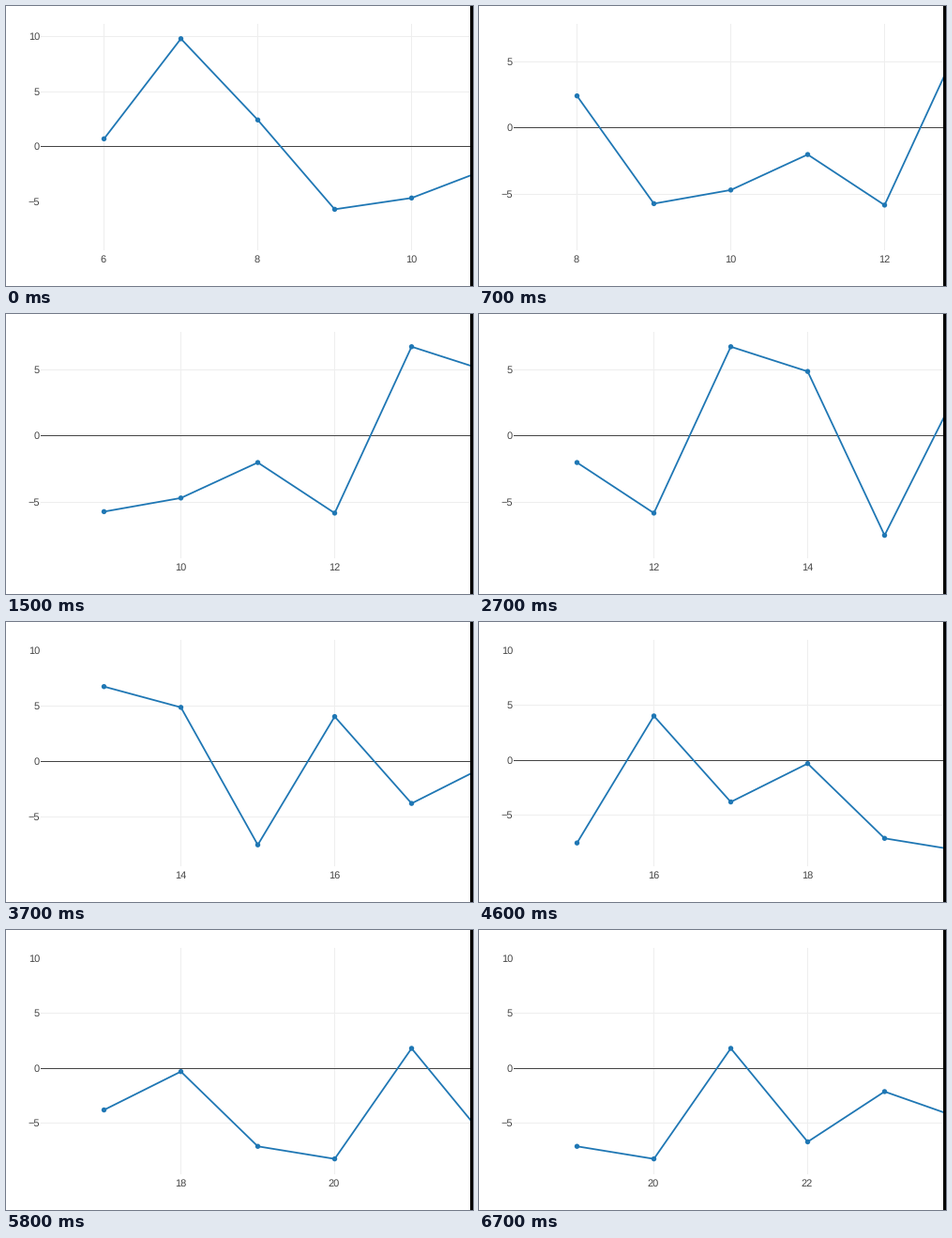
Animation of 498 by 298 pixels, one loop 7.1 s. Source, as a matplotlib script:

```python
import matplotlib.pyplot as plt
from matplotlib.animation import FuncAnimation
from matplotlib.patches import Circle, Rectangle

W, H, DPI = 498, 298, 64
STEP, LOOP = 100, 7100  # ms
PT = 72 / DPI           # points per pixel

LEFT, RIGHT, TOP, BOTTOM = 37, 495, 19, 260
HIGH_Y, LOW_Y = 34.8, 245.7   # where the largest and smallest value sit
RULED_TOP, RULED_END = 32, 208  # grid lines only inside this band
X0, DX = 104.5, 82

BLUE, DARK, GRID = "#1f77b4", "#444444", "#eeeeee"

# Streamed data from x = FIRST on; the last BUFFER points set the y range.
FIRST, BUFFER, SHOWN = 6, 15, 6
DATA = [0.71, 9.83, 2.43, -5.71, -4.68, -2.0, -5.82, 6.75, 4.88, -7.5,
        4.05, -3.77, -0.28, -7.08, -8.22, 1.83, -6.67, -2.1, -4.56, 1.2,
        -3.4, 9.62, 0.6, -8.4]

UPDATES = [700, 1500, 2700, 3700, 4600, 5800, 6700]
RATE = 1.88  # new points per update

plt.rcParams["font.family"] = "Liberation Sans"
plt.rcParams["text.hinting"] = "none"

fig = plt.figure(figsize=(W / DPI, H / DPI), dpi=DPI, facecolor="white")
ax = fig.add_axes([0, 0, 1, 1])


def box(x, y, w, h, color, z):
    ax.add_patch(Rectangle((x, y), w, h, fc=color, ec="none", lw=0,
                           antialiased=False, zorder=z))


def label(x, y, value, align):
    text = str(value).replace("-", "\u2212")
    ax.text(x, y, text, ha=align, va="baseline", color=DARK,
            fontsize=11 * PT, zorder=5)


def y_scale(skip):
    """Map values to pixels so that the buffered data fills the plot."""
    held = DATA[skip:skip + BUFFER]
    high, low = max(held), min(held)
    scale = (LOW_Y - HIGH_Y) / (high - low)
    return lambda v: HIGH_Y + (high - v) * scale


def draw_y_axis(to_y):
    for v in range(-10, 15, 5):
        y = to_y(v)
        if not TOP < y < BOTTOM:
            continue
        label(36, int(y) + 4, v, "right")
        if v == 0:
            box(LEFT, int(y), RIGHT - LEFT, 1, DARK, 2)
        elif RULED_TOP < y < RULED_END:
            box(LEFT, int(y), RIGHT - LEFT, 1, GRID, 1)


def draw_x_axis(start):
    for n in range(start + start % 2, start + 5, 2):
        x = int(X0 + DX * (n - start))
        box(x, TOP, 1, BOTTOM - TOP, GRID, 1)
        label(x, 273, n, "center")


def draw_trace(skip, to_y):
    ys = [to_y(v) for v in DATA[skip:skip + SHOWN]]
    xs = [X0 + DX * i for i in range(SHOWN)]
    ax.plot(xs, ys, color=BLUE, lw=1.8 * PT, solid_joinstyle="round",
            solid_capstyle="butt", snap=False, zorder=3)
    for x, y in zip(xs, ys):
        ax.add_patch(Circle((x, y), 2.7, fc=BLUE, ec="none", lw=0, zorder=4))


def draw(frame):
    done = sum(t <= frame * STEP for t in UPDATES)
    skip = int(0.15 + RATE * done)
    to_y = y_scale(skip)
    ax.clear()
    ax.set_xlim(0, W)
    ax.set_ylim(H, 0)
    ax.axis("off")
    draw_y_axis(to_y)
    draw_x_axis(FIRST + skip)
    draw_trace(skip, to_y)
    box(RIGHT, 0, W - RIGHT, H, "black", 6)
    return []


anim = FuncAnimation(fig, draw, frames=LOOP // STEP, interval=STEP,
                     init_func=lambda: draw(0), repeat=True, repeat_delay=0,
                     blit=False)
plt.show()
```
